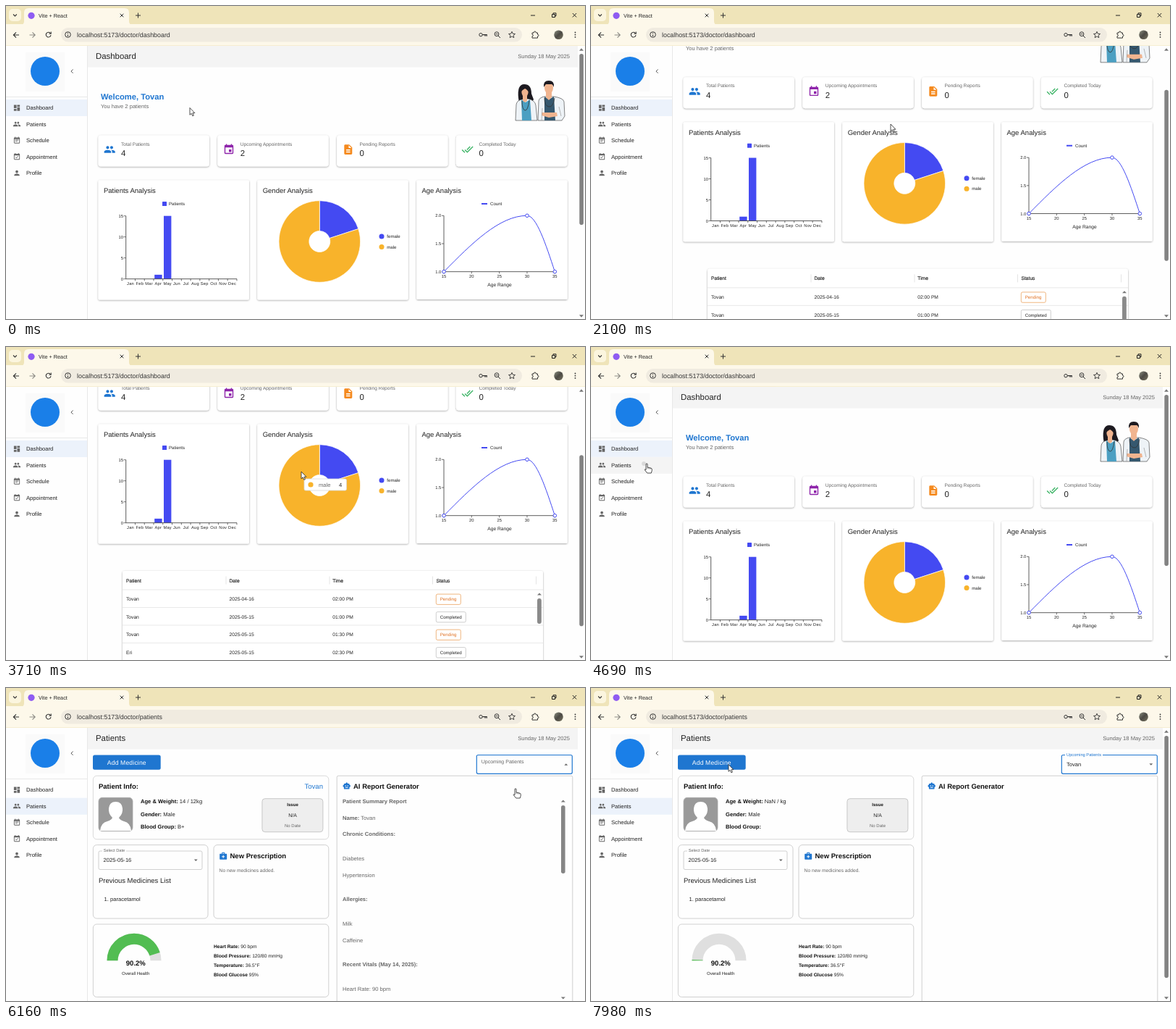
These frames come from a looping animation (800 px wide and 432 px high, 8000 ms). An HTML page:

```html
<!DOCTYPE html>
<html lang="en">
<head>
<meta charset="utf-8">
<title>Clinic dashboard</title>
<style>
html, body { margin: 0; width: 100%; height: 100%; overflow: hidden; background: #fefefe; }
svg { display: block; width: 100vw; height: 100vh; }
text { font-family: "Liberation Sans", Arial, sans-serif; text-rendering: geometricPrecision; white-space: pre; }
</style>
</head>
<body>
<svg id="stage" viewBox="0 0 800 432" xmlns="http://www.w3.org/2000/svg"></svg>
<script>
const LOOP = 8000, STEP = 70;
const BLUE = '#1f76d0', INDIGO = '#444af2', AMBER = '#f8b32b', INK = '#222', GREY = '#666';
const PATIENT = 'Tovan', OTHER = 'Eri';

// Material icon outlines, 24 x 24
const CAL = 'M19 3h-1V1h-2v2H8V1H6v2H5c-1.11 0-1.99.9-1.99 2L3 19c0 1.1.89 2 2 2h14c1.1 0 2-.9 2-2V5c0-1.1-.9-2-2-2zm0 16H5V8h14v11z';
const ICON = {
  board: 'M3 13h8V3H3v10zm0 8h8v-6H3v6zm10 0h8V11h-8v10zm0-18v6h8V3h-8z',
  people: 'M16 11c1.66 0 2.99-1.34 2.99-3S17.66 5 16 5c-1.66 0-3 1.34-3 3s1.34 3 3 3zm-8 0c1.66 0 2.99-1.34 2.99-3S9.66 5 8 5C6.34 5 5 6.34 5 8s1.34 3 3 3zm0 2c-2.33 0-7 1.17-7 3.5V19h14v-2.5c0-2.33-4.67-3.5-7-3.5zm8 0c-.29 0-.62.02-.97.05 1.16.84 1.97 1.97 1.97 3.45V19h6v-2.5c0-2.33-4.67-3.5-7-3.5z',
  note: CAL + 'M7 10h10v2H7zM7 14h7v2H7z',
  check: CAL + 'M16.53 11.06L15.47 10l-4.88 4.88-2.12-2.12-1.06 1.06L10.59 17z',
  event: CAL + 'M12 12h5v5h-5z',
  person: 'M12 12c2.21 0 4-1.79 4-4s-1.79-4-4-4-4 1.79-4 4 1.79 4 4 4zm0 2c-2.67 0-8 1.34-8 4v2h16v-2c0-2.66-5.33-4-8-4z',
  file: 'M14 2H6c-1.1 0-1.99.9-1.99 2L4 20c0 1.1.89 2 1.99 2H18c1.1 0 2-.9 2-2V8l-6-6zm2 16H8v-2h8v2zm0-4H8v-2h8v2zm-3-5V3.5L18.5 9H13z',
  done: 'M18 7l-1.41-1.41-6.34 6.34 1.41 1.41L18 7zm4.24-1.41L11.66 16.17 7.48 12l-1.41 1.41L11.66 19l12-12-1.42-1.41zM.41 13.41L6 19l1.41-1.41L1.83 12 .41 13.41z',
  bot: 'M20 9V7c0-1.1-.9-2-2-2h-3c0-1.66-1.34-3-3-3S9 3.34 9 5H6c-1.1 0-2 .9-2 2v2c-1.66 0-3 1.34-3 3s1.34 3 3 3v4c0 1.1.9 2 2 2h12c1.1 0 2-.9 2-2v-4c1.66 0 3-1.34 3-3s-1.34-3-3-3zM7.5 11.5a1.5 1.5 0 1 1 3 0a1.5 1.5 0 1 1-3 0zM16 17H8v-2h8v2zM13.5 11.5a1.5 1.5 0 1 1 3 0a1.5 1.5 0 1 1-3 0z',
  kit: 'M20 6h-4V4c0-1.1-.9-2-2-2h-4c-1.1 0-2 .9-2 2v2H4c-1.1 0-2 .9-2 2v12c0 1.1.9 2 2 2h16c1.1 0 2-.9 2-2V8c0-1.1-.9-2-2-2zM10 4h4v2h-4V4zm6 11h-3v3h-2v-3H8v-2h3v-3h2v3h3v2z'
};

// Markup helpers
const text = (x, y, s, size, fill = INK, more = '') => `<text x="${x}" y="${y}" font-size="${size}" fill="${fill}" ${more}>${s}</text>`;
const bold = (x, y, s, size, fill = '#111', more = '') => text(x, y, s, size, fill, 'font-weight="700" ' + more);
const MID = 'text-anchor="middle"', END = 'text-anchor="end"';
const rect = (x, y, w, h, fill, r = 0, more = '') => `<rect x="${x}" y="${y}" width="${w}" height="${h}" rx="${r}" fill="${fill}" ${more}/>`;
const box = (x, y, w, h, r = 5, stroke = '#c4c4c4', fill = 'none') => rect(x, y, w, h, fill, r, `stroke="${stroke}" stroke-width=".8"`);
const paper = (x, y, w, h, r) => rect(x, y, w, h, '#fff', r, 'filter="url(#shadow)"');
const dot = (x, y, r, fill, more = '') => `<circle cx="${x}" cy="${y}" r="${r}" fill="${fill}" ${more}/>`;
const fillPath = (d, fill, more = '') => `<path d="${d}" fill="${fill}" ${more}/>`;
const line = (d, stroke = '#333', w = 1, more = '') => `<path d="${d}" fill="none" stroke="${stroke}" stroke-width="${w}" ${more}/>`;
const icon = (name, cx, cy, size, fill) => fillPath(ICON[name], fill, `fill-rule="evenodd" transform="translate(${cx - size / 2} ${cy - size / 2}) scale(${size / 24})"`);
const tri = (x, y, w, h, fill = '#777') => fillPath(`M${x - w} ${y - h / 2}h${2 * w}l${-w} ${h}z`, fill);
const group = (id, body, more = '') => `<g id="${id}" ${more}>${body}</g>`;
const pair = (x, y, label, value, size) => text(x, y, `<tspan font-weight="700" fill="#111">${label}</tspan> ${value}`, size);

function browser() {
  return rect(0, 0, 800, 55, '#efe4b9') + rect(4, 4, 17, 17, '#fbf5de', 5)
    + line('M10 11.5l2.4 2.4l2.4-2.4', '#333', 1.1)
    + fillPath('M20 26q5 0 5-5V9q0-6 6-6h133q6 0 6 6v12q0 5 5 5z', '#fdf8ea')
    + rect(0, 25, 800, 29.5, '#fdf8ea') + rect(76, 30, 637, 19.5, '#f0ebe0', 9.7)
    + dot(35, 13.3, 4.6, '#8f5cf2') + text(45, 15.8, 'Vite + React', 7.3)
    + line('M157.7 10.7l4.6 4.6m0-4.6l-4.6 4.6M179 13h7M182.5 9.5v7', '#333')
    + line('M725 13h6M782.8 10l5.4 5.4m0-5.4l-5.4 5.4', '#222')
    + line('M754.5 11.5h4v4h-4zM756 11.3v-1.5h4v4h-1.4', '#222')
    + line('M18 40h-7.500M14 36.300l-3.700 3.700l3.700 3.700', '#333', 1.1)
    + line('M32.500 40h7.500M36.500 36.300l3.700 3.700l-3.700 3.700', '#8b8a84', 1.1)
    + line('M61.300 37.500a3.400 3.400 0 1 0 .7 2.700M62.200 35.500v2.700h-2.700', '#333', 1.1)
    + line('M85.500 39.500v2.500M85.500 37v1.100', '#333') + dot(85.5, 39.5, 3.8, 'none', 'stroke="#333"')
    + dot(656, 39.7, 2.2, 'none', 'stroke="#333"') + line('M658.200 39.700h6v2M662 39.700v2', '#333', 1.2)
    + dot(678, 38.7, 2.9, 'none', 'stroke="#333"') + line('M680 41l3 3M676.500 38.700h3', '#333')
    + line('M699 35.300l1.300 2.900l3.200.3l-2.400 2.100l.7 3.100l-2.800-1.700l-2.800 1.700l.7-3.100l-2.400-2.100l3.200-.3z', '#333', .9)
    + line('M727 37h2.300q0-2 1.500-2t1.500 2h2.200v2.300q1.500 0 1.500 1.300t-1.500 1.300v2.200H727v-2.400q1.500-.2 1.500-1.200t-1.500-1.200z', '#333')
    + dot(763.5, 39.7, 6.3, 'url(#photo)')
    + [36.5, 39.7, 42.9].map(y => dot(786.5, y, .9, '#333')).join('')
    + group('url', '');
}

function sidebar() {
  const items = [['board', 'Dashboard'], ['people', 'Patients'], ['note', 'Schedule'], ['check', 'Appointment'], ['person', 'Profile']];
  return rect(0, 54.5, 113, 378, '#fefefe') + line('M112.500 55V432M0 125.500H112', '#e3e3e3', .8)
    + rect(27, 64, 54, 54, '#fafafa') + dot(54, 90, 20, '#1a7fe8')
    + line('M92.500 87.500l-2.500 2.600l2.500 2.600', '#555')
    + rect(0, 129, 112, 23, '#ecf2fb', 0, 'id="row0"') + rect(0, 151.7, 112, 23, '#f4f4f4', 0, 'id="row1"')
    + dot(73, 161, 3, '#000', 'id="ripple" opacity=".1" clip-path="url(#row)"')
    + items.map(([ic, label], i) => icon(ic, 15, 140.5 + 22.5 * i, 11, '#666') + text(28, 143.2 + 22.5 * i, label, 7.63)).join('');
}

const header = title => rect(113, 55, 677, 29.5, '#f4f4f4') + text(124, 73.2, title, 11.4)
  + text(779, 72.3, 'Sunday 18 May 2025', 7.6, GREY, END);

function doctors() {
  const coat = '#eef3f7', skin = '#f0b48f';
  return fillPath('M708 127q-2-19 8-19q10 0 10 13l3 8l-3 5h-17z', '#1d1a20')
    + fillPath('M704 158l1-22q1-6 8-7l8-1q10 2 11 9l2 21z', coat, 'stroke="#333" stroke-width=".6"')
    + fillPath('M712 129l6 4l6-4l2 29h-13z', '#4b9fc2') + fillPath('M714 123h6v8l-3 2l-3-2z', skin)
    + `<ellipse cx="717" cy="119" rx="4.600" ry="6.400" fill="${skin}"/>`
    + fillPath('M711 119q0-8 6-8q6 0 6 9q-3-5-6-6q-4 2-6 5z', '#1d1a20')
    + line('M713 131q0 12 4 13t6-14', '#333', .8)
    + fillPath('M735 158l1-27q1-5 8-6h13q13 2 14 7l1 20l-4 6z', coat, 'stroke="#333" stroke-width=".6"')
    + fillPath('M744 125l6 4l7-4l2 33h-15z', '#35586f') + fillPath('M746 118h8v8l-4 4l-4-4z', skin)
    + `<ellipse cx="750" cy="113" rx="6" ry="8" fill="${skin}"/>`
    + fillPath('M743 112q-1-9 7-9q8 0 7 9q-2-4-3-4h-8z', '#1d1a20')
    + line('M744 127q0 11 6 12t8-12', '#333', .8)
    + fillPath('M740 147l9 0l12 0l1 5l-12 2l-10-3z', skin) + line('M740 158l1-17M767 152l-3-13', '#999', .7);
}

function stats() {
  return [['people', '#1f76d0', 'Total Patients', 4], ['event', '#8e24aa', 'Upcoming Appointments', 2],
    ['file', '#f58a1f', 'Pending Reports', 0], ['done', '#3fb568', 'Completed Today', 0]]
    .map(([ic, color, label, n], i) => {
      const x = 127.5 + 164.8 * i;
      return paper(x, 178.5, 153.5, 43, 4) + icon(ic, x + 15.7, 198, 16.5, color)
        + text(x + 31.5, 192.5, label, 6.6, GREY) + text(x + 31.5, 207, n, 11.4);
    }).join('');
}

function barChart() {
  const base = 376.7, unit = 5.8, band = 12.77, x0 = 165.7;
  let s = paper(127.5, 240.500, 208.5, 165, 2) + text(135, 258.4, 'Patients Analysis', 9.5)
    + rect(216, 270, 6, 6, INDIGO, .6) + text(225, 275.3, 'Patients', 6.1);
  [0, 5, 10, 15].forEach(v => {
    const y = base - v * unit;
    s += line(`M${x0 - 3} ${y}h3`, '#333', .7) + text(x0 - 3.700, y + 2, v, 5.8, INK, END);
  });
  [[3, 1], [4, 15]].forEach(([m, v]) => s += rect(x0 + m * band + 1.2, base - v * unit, 10.4, v * unit, INDIGO));
  s += line(`M${x0} ${base - 15 * unit}V${base}H319`, '#333', .8);
  'Jan Feb Mar Apr May Jun Jul Aug Sep Oct Nov Dec'.split(' ').forEach((m, i) => {
    s += line(`M${x0 + (i + 1) * band} ${base}v2.700`, '#333', .7)
      + text(x0 + (i + .5) * band, 385.2, m, 5.7, INK, MID + ' letter-spacing=".25"');
  });
  return s;
}

function pieChart() {
  const cx = 433.3, cy = 325, R = 56.3, r = 14.5;
  const at = (q, deg) => `${cx + q * Math.sin(deg * Math.PI / 180)} ${cy - q * Math.cos(deg * Math.PI / 180)}`;
  const slice = (a, b, fill) => {
    const big = +(b - a > 180);
    return fillPath(`M${at(R, a)}A${R} ${R} 0 ${big} 1 ${at(R, b)}L${at(r, b)}A${r} ${r} 0 ${big} 0 ${at(r, a)}z`, fill, 'stroke="#fff" stroke-width=".7"');
  };
  return paper(347.3, 240.5, 208.5, 165, 2) + text(354.7, 258.4, 'Gender Analysis', 9.5)
    + slice(0, 72, INDIGO) + slice(72, 360, AMBER)
    + [['female', INDIGO], ['male', AMBER]].map(([s, c], i) => dot(519, 318 + 14.5 * i, 3.5, c) + text(526.3, 320 + 14.5 * i, s, 6.1)).join('');
}

function ageChart() {
  const x0 = 605, x1 = 758.3, top = 289.3, base = 366.7;
  let s = paper(567.2, 240.5, 208.5, 164.5, 2) + text(574.5, 258.4, 'Age Analysis', 9.5)
    + line('M657 273h8', INDIGO, 2) + text(669, 275.2, 'Count', 6.1)
    + line(`M${x0} ${top}V${base}H${x1}`, '#333', .8);
  ['2.0', '1.5', '1.0'].forEach((v, i) => {
    const y = top + i * (base - top) / 2;
    s += line(`M${x0 - 3} ${y}h3`, '#333', .7) + text(601.3, y + 2, v, 5.8, INK, END);
  });
  [15, 20, 25, 30, 35].forEach((v, i) => {
    const x = x0 + i * (x1 - x0) / 4;
    s += line(`M${x} ${base}v2.700`, '#333', .7) + text(x, 375.2, v, 5.8, INK, MID);
  });
  s += line(`M605 366.700C643.300 328 681.700 289.300 720 289.300C732.700 289.300 745.600 328 758.300 366.700`, INDIGO, 1);
  [[x0, base], [720, top], [x1, base]].forEach(([x, y]) => s += dot(x, y, 2.3, '#fff', `stroke="${INDIGO}"`));
  return s + text(682, 387, 'Age Range', 6.7, INK, MID);
}

function table() {
  const cols = [166, 308.5, 451.3, 594.5], top = 443;
  let s = paper(161, top, 581, 173, 3) + line('M304 450.500v11M447 450.500v11M589.500 450.500v11M732.500 450.500v11', '#ddd', .8);
  ['Patient', 'Date', 'Time', 'Status'].forEach((h, i) => s += text(cols[i], 458.5, h, 6.7, INK, 'stroke="#222" stroke-width=".15"'));
  [[PATIENT, '04-16', '02:00', 1], [PATIENT, '05-15', '01:00', 0], [PATIENT, '05-15', '01:30', 1],
    [OTHER, '05-15', '02:30', 0], [PATIENT, '05-16', '01:00', 1]].forEach(([who, day, time, pending], i) => {
    const y = 484.3 + 24.5 * i;
    s += line(`M161 ${y - 15.300}H742`, '#e4e4e4', .8)
      + text(cols[0], y, who, 6.7) + text(cols[1], y, '2025-' + day, 6.7) + text(cols[2], y, time + ' PM', 6.7)
      + box(594.3, y - 9.2, pending ? 34 : 41, 14.3, 2, pending ? '#eba25f' : '#c2c2c2')
      + text(599.7, y - .1, pending ? 'Pending' : 'Completed', 6.2, pending ? '#e07020' : INK);
  });
  return s + line('M161 591.500H742', '#e0e0e0', .8)
    + rect(734, 481, 5.8, 35, '#8a8a8a', 2.9) + tri(737, 475, 3, -3) + tri(737, 586, 3, 3)
    + text(571, 605.3, 'Rows per page:', 6.6) + text(625, 605.3, '100', 6.7) + tri(641.5, 603.5, 2.4, 2.4, '#666')
    + text(662.5, 605.3, '1–16 of 16', 6.7) + line('M714 600.500l-2.500 2.700l2.500 2.700M730 600.500l2.500 2.700l-2.500 2.700', '#b5b5b5');
}

function dashboard() {
  return header('Dashboard') + bold(131, 128.8, 'Welcome, ' + PATIENT, 11.2, BLUE)
    + text(131, 141.2, 'You have 2 patients', 7.57, GREY)
    + doctors() + stats() + barChart() + pieChart() + ageChart() + table();
}

function report() {
  const rows = [[159, 1, 'Patient Summary Report'], [204, 1, 'Chronic Conditions:'], [238, 0, 'Diabetes'], [260.5, 0, 'Hypertension'],
    [294.3, 1, 'Allergies:'], [328, 0, 'Milk'], [350.7, 0, 'Caffeine'], [384.3, 1, 'Recent Vitals (May 14, 2025):'], [418, 0, 'Heart Rate: 90 bpm']];
  return rows.map(([y, b, s]) => (b ? bold : text)(465, y, s, 7.6, GREY)).join('')
    + text(465, 181.5, `<tspan font-weight="700">Name:</tspan> ${PATIENT}`, 7.6, GREY)
    + rect(767, 162, 5.6, 94, '#858585', 2.8) + tri(769.8, 156, 3, -3) + tri(769.8, 428, 3, 3);
}

function patients() {
  const arc = 'M147 376.300a30 30 0 0 1 60 0';
  return header('Patients') + rect(120, 92.5, 93.7, 20.3, BLUE, 2.500)
    + text(166.8, 105.6, 'Add Medicine', 8.6, '#fff', MID + ' letter-spacing=".16"')
    + box(120.4, 121.2, 325.4, 87.6, 5, '#d0d0d0') + bold(128, 138.6, 'Patient Info:', 9.5)
    + box(128, 151.3, 47, 46.3, 5, '#aaa', '#999')
    + fillPath('M130 197q1-11 10-13q6-2 7-5q-6-6-5-13q1-9 9.500-9t9.500 9q1 7-5 13q1 3 7 5q9 2 10 13z', '#fff')
    + pair(186, 176.7, 'Gender:', 'Male', 7.6)
    + box(353.9, 152.7, 84, 46, 4, '#bdbdbd', '#eee') + bold(396, 163.4, 'Issue', 6.1, '#111', MID)
    + text(396, 178, 'N/A', 6.9, INK, MID) + text(396, 191.8, 'No Date', 6, GREY, MID)
    + box(120.4, 216.6, 158.6, 101.5) + box(128, 225, 143, 25.5, 2) + rect(133, 223, 33, 4, '#fefefe')
    + text(134.7, 226, 'Select Date', 5.72, GREY) + text(134.5, 240.2, '2025-05-16', 7.6) + tri(262.3, 237.8, 2.4, 2.4, '#666')
    + text(128, 268.7, 'Previous Medicines List', 9.5) + text(135.500, 294, '1. paracetamol', 7.6)
    + box(287, 216.6, 158.8, 101.5) + icon('kit', 300.2, 231.7, 12, BLUE) + bold(309.5, 235, 'New Prescription', 9.5)
    + text(294.6, 253.8, 'No new medicines added.', 6.67, GREY)
    + box(120.4, 326, 325.4, 100.5) + line(arc, '#dfdfdf', 15) + line(arc, '#52bd52', 15, 'id="gauge" pathLength="100"')
    + bold(179.3, 383.2, '90.2%', 9.5, '#111', MID) + text(179.2, 396, 'Overall Health', 6.07, INK, MID)
    + [['Heart Rate:', '90 bpm'], ['Blood Pressure:', '120/80 mmHg'], ['Temperature:', '36.5°F'], ['Blood Glucose', '95%']]
      .map(([k, v], i) => pair(287, 358.5 + 13.2 * i, k, v, 6.65)).join('')
    + box(457.2, 121.2, 325.6, 330, 2) + icon('bot', 470.7, 135.3, 11.5, BLUE) + bold(480, 138.8, 'AI Report Generator', 9.5)
    + group('loaded', text(438, 138.6, PATIENT, 9.55, BLUE, END) + pair(186, 158.8, 'Age &amp; Weight:', '14 / 12kg', 7.6)
      + pair(186, 194.1, 'Blood Group:', 'B+', 7.6) + report())
    + group('blank', pair(186, 158.8, 'Age &amp; Weight:', 'NaN / kg', 7.6) + pair(186, 194.1, 'Blood Group:', '', 7.6))
    + rect(650.3, 92.5, 132, 25.8, '#fefefe', 2, 'id="select"')
    + group('hint', text(656.7, 104, 'Upcoming Patients', 7.03, GREY))
    + group('chosen', rect(655, 90.5, 52, 4, '#fefefe') + text(657, 93.7, 'Upcoming Patients', 5.72, BLUE) + text(657, 108, PATIENT, 7.6))
    + group('closed', tri(773.8, 105.5, 2.4, 2.4, GREY)) + group('opened', tri(773.8, 105.500, 2.4, -2.4, GREY))
    + group('menu', paper(650.3, 119.5, 132, 44, 2) + rect(650.3, 134, 132, 14, '#f4f4f4') + text(658, 143.6, PATIENT, 7.6) + text(658, 157.6, OTHER, 7.6));
}

const svg = document.getElementById('stage');
svg.innerHTML = `<defs>
  <filter id="shadow" x="-10%" y="-20%" width="120%" height="150%"><feDropShadow dx="0" dy=".8" stdDeviation="1" flood-opacity=".38"/></filter>
  <linearGradient id="photo" x2="1" y2="1"><stop stop-color="#8d9182"/><stop offset=".5" stop-color="#4c4a44"/><stop offset="1" stop-color="#77735f"/></linearGradient>
  <clipPath id="view"><rect x="113" y="54.500" width="677" height="378"/></clipPath>
  <clipPath id="row"><rect y="151.700" width="112" height="23"/></clipPath>
  </defs>` + rect(0, 0, 800, 432, '#fefefe')
  + `<g clip-path="url(#view)">${group('dash', dashboard())}${group('pat', patients())}</g>`
  + group('bar', tri(795, 60, 3, -3.5) + tri(795, 428, 3, 3.5) + rect(792.3, 66, 5.6, 236, '#828282', 2.8, 'id="thumb"'))
  + sidebar() + browser()
  + group('tip', rect(0, 0, 58.5, 16, '#fff', 2, 'stroke="#d8d8d8" stroke-width=".8"') + dot(9, 8, 3.6, AMBER) + text(20, 10.6, 'male', 7.6, GREY) + text(48, 10.6, '4', 7.6))
  + group('arrow', fillPath('M0 0V9.800L2.200 7.800L3.800 11.300L5.400 10.600L3.900 7.200H6.900z', '#fff', 'stroke="#222" stroke-width=".8"'))
  + group('hand', fillPath('M-1 1q0-1.200 1-1.200t1 1.200v4l5 1.200q1.200.4 1.200 1.600v2l-1 3.200h-5.500l-3.700-4.600q.8-1.400 2 .2z', '#fff', 'stroke="#222" stroke-width=".8"')
    + line('M1 5v2.200M3 5.500v2M5 6v1.800', '#444', .6));

const $ = id => document.getElementById(id);
const show = (id, on) => $(id).setAttribute('display', on ? 'inline' : 'none');
const move = (id, x, y) => $(id).setAttribute('transform', `translate(${x} ${y})`);
const clamp = v => Math.max(0, Math.min(1, v));
const ease = p => p * p * (3 - 2 * p);

// Eased interpolation through [time, ...values] keys
function track(keys, t) {
  const i = keys.findIndex(k => k[0] > t);
  if (i < 0) return keys[keys.length - 1].slice(1);
  if (i === 0) return keys[0].slice(1);
  const a = keys[i - 1], b = keys[i], p = ease((t - a[0]) / (b[0] - a[0]));
  return a.slice(1).map((v, j) => v + (b[j + 1] - v) * p);
}

const POINTER = [[0, 254, 140.5], [350, 254, 140.5], [1120, 82, 143.500], [1400, 82, 143.500], [1960, 414, 163], [2660, 414, 163],
  [3080, 408, 172], [4060, 408, 172], [4620, 73, 161], [4690, 77, 161], [5180, 77, 161], [5880, 712, 104],
  [6020, 712, 104], [6160, 704, 139], [7350, 700, 140], [7420, 700, 140], [7910, 190, 105.5]];
const SCROLL = [[1890, 0], [2170, 95], [2450, 188], [3500, 188], [3700, 134], [3800, 134], [4130, 0]];
const OPEN = 6090, PICK = 7420, PAGE = 5110;

function draw(t) {
  const onPat = t >= PAGE, [x, y] = track(POINTER, t), [scroll] = track(SCROLL, t);
  show('dash', !onPat);
  show('pat', onPat);
  move('dash', 0, -scroll);
  $('url').innerHTML = text(98, 42.8, 'localhost:5173/doctor/' + (onPat ? 'patients' : 'dashboard'), 8.9, '#333');

  const open = t >= OPEN && t < PICK, picked = t >= PICK, loaded = t >= 5390 && !picked;
  show('bar', !open);
  $('thumb').setAttribute('y', 66 + scroll * .622);
  $('thumb').setAttribute('height', onPat ? 334 : 236);

  const inRow = i => x < 112 && y > 129 + 22.700 * i && y < 151.7 + 22.700 * i;
  $('row0').setAttribute('fill', onPat ? (inRow(0) ? '#f4f4f4' : 'none') : inRow(0) ? '#e1edf8' : '#ecf2fb');
  $('row1').setAttribute('fill', onPat ? (inRow(1) ? '#e1edf8' : '#ecf2fb') : inRow(1) ? '#f4f4f4' : 'none');
  const wave = (t - 4690) / 500;
  show('ripple', wave >= 0 && wave < 1);
  $('ripple').setAttribute('r', 3 + 80 * ease(clamp(wave)));
  $('ripple').setAttribute('opacity', .1 * (1 - clamp(wave * 2 - 1)));

  show('loaded', loaded);
  show('blank', !loaded);
  show('hint', !picked);
  show('chosen', picked);
  show('opened', open);
  show('closed', !open);
  $('select').setAttribute('stroke', t >= OPEN ? BLUE : '#c4c4c4');
  $('select').setAttribute('stroke-width', t >= OPEN ? 1.2 : .8);
  show('menu', open && t > 6160);
  $('menu').setAttribute('opacity', clamp((t - 6160) / 210));
  const level = t < 7910 ? 90.2 * ease(clamp((t - 5180) / 700)) : 1.2 * (t - 7910) / 70;
  $('gauge').setAttribute('stroke-dasharray', `${level} 200`);

  const stale = t >= 2450 && t < 2660;
  show('tip', t >= 2450 && t < PAGE && scroll > 95);
  move('tip', stale ? 511.5 : x + 4, stale ? 362 : y + 10);

  const hand = (x < 112 && t < PAGE + 400) || (t > 5800 && t < 7490);
  show('hand', hand);
  show('arrow', !hand);
  move(hand ? 'hand' : 'arrow', x, y);
}

function tick(now) {
  const t = now % LOOP;
  draw(Math.floor(t / STEP) * STEP);
  requestAnimationFrame(tick);
}
draw(0);
requestAnimationFrame(tick);
</script>
</body>
</html>
```
